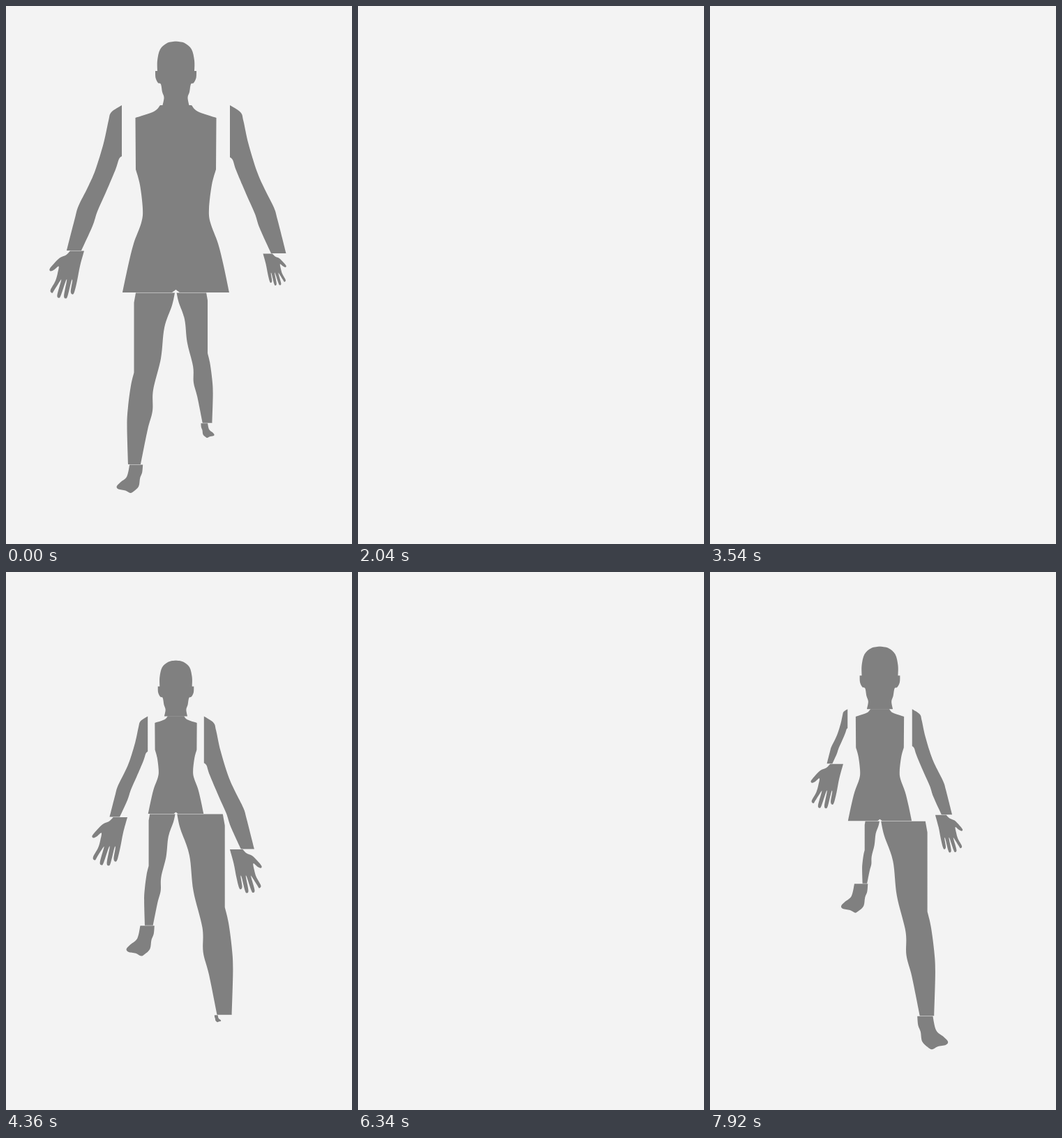
These frames come from a looping animation (496 px wide and 770 px high, 8 s). An HTML page:

```html
<!DOCTYPE html>
<html lang="en">
<head>
<meta charset="utf-8">
<title>Body parts</title>
<style>
  html, body { margin: 0; width: 100%; height: 100%; overflow: hidden; background: #f3f3f3; }
  svg { display: block; width: 496px; height: 770px; }
  path { fill: #000; fill-opacity: .473; }
</style>
</head>
<body>
<svg viewBox="0 0 496 770" xmlns="http://www.w3.org/2000/svg"></svg>
<script>
const LOOP = 8000, MID = 243.5, CENTER = 276.5, GAP = 0.5;
const svg = document.querySelector('svg');

// "x y x y|x y": smooth runs of points, joined by straight lines.
const parse = text => text.split('|').map(run => {
  const n = run.trim().split(/\s+/).map(Number);
  return n.filter((_, i) => i % 2 === 0).map((x, i) => [x, n[2 * i + 1]]);
});

// Catmull-Rom spline through one run.
function curve(run) {
  const at = i => run[Math.max(0, Math.min(run.length - 1, i))];
  let d = `L${run[0]}`;
  for (let i = 0; i < run.length - 1; i++) {
    const [a, b, c, e] = [at(i - 1), at(i), at(i + 1), at(i + 2)];
    const c1 = b.map((v, k) => v + (c[k] - a[k]) / 6);
    const c2 = c.map((v, k) => v - (e[k] - b[k]) / 6);
    d += `C${c1} ${c2} ${c}`;
  }
  return d;
}

const outline = runs => 'M' + runs.map(curve).join('').slice(1) + 'Z';

// Complete a left half with its reflection.
function mirrored(half) {
  const other = half.map(run => run.map(([x, y]) => [2 * MID - x, y]).reverse()).reverse();
  return outline([...half, ...other]);
}

// Four fingers fan out from evenly spaced knuckles; the middle ones are longest.
function handOutline() {
  const run = [[112, 350], [106, 372]];
  for (let i = 0; i < 4; i++) {
    const knuckle = 98.5 - 8.1 * i, tip = 95.5 - 9.7 * i;
    const end = 418.5 - 3.2 * (i - 1.4) ** 2;
    run.push([knuckle + 3.4, 393], [tip + 2.7, end - 4], [tip, end], [tip - 2.7, end - 4], [knuckle - 3.4, 393]);
  }
  const thumb = parse('74 382 75.5 372 69 377 64 379 62.5 376 68 369 77 360 86 356 92 350')[0];
  return outline([[...run, ...thumb]]);
}

const shapes = {
  torso: mirrored(parse(`243.5 406 238 410|167 410 175 372 183 340 194 310 196 290
    192 256 186 234|185.5 160 212 151 221 142`)),
  head: mirrored(parse(`243.5 50.5 231 53 221 62 217 78 217 93|
    214 93 214.5 103 218 110 222 112 224 123 226.5 131 224.5 142`)),
  arm: outline(parse(`166 142 151 152 147 164 140 196 128 235 117 260 104 286 99 303 87 350|
    108 350 124 315 131 294 143 267 157 234 162 219 166 215`)),
  hand: handOutline(),
  leg: outline(parse(`186 410|242 410 238 428 227 460 222 504 211 549 210 579 203 606 193 655.5|
    175 655.5 173.5 600 175 573 179 543 183.5 524|183.5 424`)),
  foot: outline(parse(`177 656|196 656 195 667 192 675 190 687 183 694 178 696.5
    171 693 161 691 158.5 687 164 681 173 673 177 656`))
};

// Scales that make a figure fill a box; the longer leg takes the roomier side.
function fit(left, top, right, bottom) {
  const height = CENTER - top;
  const torso = 0.47 * height / 134.5, head = 0.53 * height / 92;
  const shoulder = 77.5 * torso;
  const l = (MID - left - shoulder) / 104;
  const r = (right - MID - shoulder - 24.7) / 65;
  const long = (bottom - CENTER - 133.5 * torso) / 287, short = 0.65 * long;
  const [legL, legR] = MID - left > right - MID ? [long, short] : [short, long];
  return [torso, head, l, l, r, r, legL, legL, legR, legR];
}

// Start, end, then scales of torso, head, arm + hand (left, right), leg + foot (left, right).
const poses = [
  [0, 580, 1, 1, 1, 1, 1.019, .67, 1, 1, .759, .51],
  [740, 1340, ...fit(151, 134, 356, 604)],
  [1480, 2040, ...fit(109, 137, 368, 624)],
  [2180, 2700, ...fit(145, 137, 324, 645)],
  [2880, 3540, ...fit(100, 166, 357, 541)],
  [3680, 4220, ...fit(82, 81, 381, 537)],
  [4360, 4920, .52, .875, .692, 1.02, .913, .92, .649, 1.07, 1.17, .25],
  [5060, 5640, .953, 1.054, .79, .59, .529, .66, 1.127, .975, 1.135, 1.15],
  [5760, 6340, ...fit(130, 198, 338, 589)],
  [6500, 7120, ...fit(168, 144, 344, 663)],
  [7280, 7760, ...fit(125, 128, 377, 597)],
  [7920, 8000, .597, .98, .375, .935, .726, .79, .363, 1.02, 1.135, 1.17]
];

const add = (tag, parent) => parent.appendChild(document.createElementNS(svg.namespaceURI, tag));

function build([on, off, torso, head, armL, handL, armR, handR, legL, footL, legR, footR]) {
  const group = add('g', svg);
  const top = CENTER - 134.5 * torso;
  const hip = CENTER + 133.5 * torso + GAP;
  const shoulder = 77.5 * torso;

  // Scale a part about its pivot and move the pivot to (x, y).
  function place(name, px, py, x, y, scale, side = 1) {
    const part = add('path', group);
    part.setAttribute('d', shapes[name]);
    part.setAttribute('transform',
      `translate(${x} ${y}) scale(${side * scale} ${scale}) translate(${-px} ${-py})`);
  }

  place('torso', MID, CENTER, MID, CENTER, torso);
  place('head', MID, 142, MID, top, head);

  const wristL = MID - shoulder - 79 * armL;
  const wristR = MID + shoulder + 24.7 + 38.8 * armR;
  for (const [side, arm, hand, wrist] of [[1, armL, handL, wristL], [-1, armR, handR, wristR]]) {
    place('arm', 166, 142, MID - side * shoulder, top, arm, side);
    place('hand', 87, 350, wrist, top + 208 * arm + GAP, hand, side);
  }
  for (const [side, leg, foot] of [[1, legL, footL], [-1, legR, footR]]) {
    place('leg', MID, 410, MID, hip, leg, side);
    place('foot', 196, 656, MID - side * 47.3 * leg, hip + 245.5 * leg + GAP, foot, side);
  }
  return { on, off, group };
}

const figures = poses.map(build);

function draw() {
  const t = performance.now() % LOOP;
  for (const { on, off, group } of figures) {
    group.style.display = t >= on && t < off ? '' : 'none';
  }
  requestAnimationFrame(draw);
}
draw();
</script>
</body>
</html>
```
